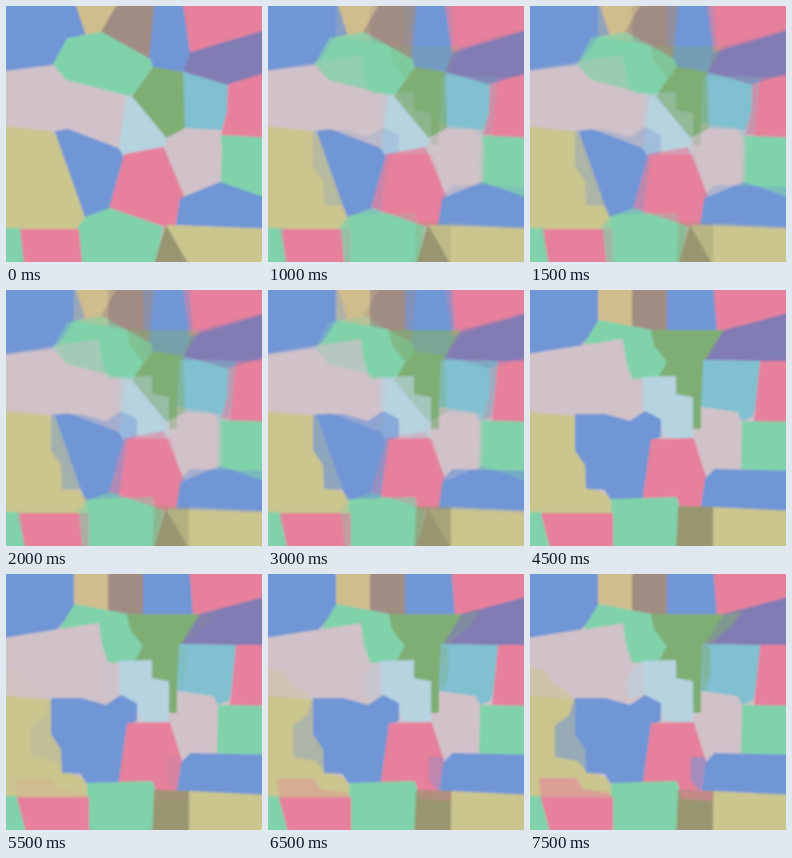
An HTML page for the animation above (8 s loop, 256 px wide and 256 px high).

```html
<!DOCTYPE html>
<html>
<head>
<meta charset="utf-8">
<style>
html, body { margin: 0; width: 100%; height: 100%; overflow: hidden; background: #c9bfc2; }
svg { display: block; width: 100vw; height: 100vh; }
path { stroke-width: 2; stroke-linejoin: round; }
</style>
</head>
<body>
<svg viewBox="0 0 256 256">
  <defs>
    <filter id="soft" filterUnits="userSpaceOnUse" x="-12" y="-12" width="280" height="280">
      <feGaussianBlur stdDeviation="0.9"/>
    </filter>
  </defs>
  <g id="straight" filter="url(#soft)"></g>
  <g id="stepped" filter="url(#soft)"></g>
  <g id="spread" filter="url(#soft)"></g>
</svg>
<script>
const NS = 'http://www.w3.org/2000/svg';
const STEP = 500, LOOP = 8000, FADE_STEPS = 9, SECOND_FADE = 10;
const [straight, stepped, spread] = ['straight', 'stepped', 'spread']
  .map(id => document.getElementById(id));

const C = {
  blue: '#7096d6', mint: '#80d2ab', mauve: '#d0c2c8', sand: '#cbc58e',
  tan: '#d0bd8e', brown: '#a18c83', rose: '#e6809c', violet: '#827cb4',
  green: '#7fae74', teal: '#80c0d0', ice: '#b6d3e0', olive: '#98966f'
};

// Points on the stage border are pushed outwards so the blur never shows there.
const outset = v => v <= 0 ? -10 : v >= 256 ? 266 : v;

function patch(group, color, points) {
  const path = document.createElementNS(NS, 'path');
  const pts = points.split(' ').map(p => p.split(',').map(n => outset(+n)));
  path.setAttribute('d', 'M' + pts.join('L') + 'Z');
  path.setAttribute('fill', C[color]);
  path.setAttribute('stroke', C[color]);
  group.appendChild(path);
}

function cell(color, from, to) {
  patch(straight, color, from);
  patch(stepped, color, to);
}

for (const g of [straight, stepped]) patch(g, 'mauve', '0,0 256,0 256,256 0,256');

cell('blue', '0,0 68,0 80,27 62,33 47,60 0,67',
  '0,0 69,0 69,31 58,46 50,55 0,66');
cell('tan', '68,0 117,0 96,27 80,27',
  '69,0 103,0 103,38 69,32');
cell('brown', '117,0 150,0 144,54 96,26',
  '103,0 138,0 138,41 103,41');
cell('blue', '150,0 177,0 185,47 178,67 147,62 144,54',
  '138,0 184,0 189,20 186,42 138,41');
cell('rose', '177,0 256,0 256,23 185,47',
  '184,0 256,0 256,22 188,42');
cell('violet', '185,47 256,23 256,66 222,79 178,67',
  '190,42 256,22 256,71 175,69');
cell('mint', '62,33 96,27 144,54 146,63 130,86 119,90 60,75 47,60',
  '69,31 95,36 122,41 125,55 138,72 130,87 103,88 95,65 92,50 55,54');
cell('green', '147,62 178,67 180,122 160,132 126,92 146,64',
  '122,41 192,41 174,70 172,138 162,138 162,108 145,105 145,87 130,87 138,72 125,55');
cell('teal', '178,67 222,80 222,106 214,124 180,122',
  '174,71 230,72 230,100 222,126 211,130 207,122 172,118');
cell('rose', '256,66 223,79 222,106 216,129 256,133',
  '231,72 256,72 256,133 225,131');
cell('mint', '216,130 256,133 256,195 214,177 213,140',
  '211,132 256,133 256,182 210,178');
cell('mauve', '159,134 180,123 212,125 215,140 214,177 178,191',
  '172,118 207,123 211,132 210,178 185,181 176,190 163,150 172,138');
cell('ice', '119,90 126,92 160,133 157,143 119,149 112,142',
  '113,88 145,87 145,105 162,108 162,148 135,146 130,130 112,118');
cell('mauve', '0,67 47,60 60,75 119,90 112,142 52,126 44,126 0,119',
  '0,66 92,50 98,90 112,90 112,118 95,131 75,125 46,126 0,122');
cell('sand', '0,120 44,126 51,131 80,212 72,223 0,223',
  '0,122 46,127 46,160 55,175 58,198 78,206 82,223 0,223');
cell('blue', '50,126 62,124 112,143 118,153 104,202 80,211',
  '46,125 75,125 100,132 115,122 130,130 130,146 122,150 114,207 82,210 75,199 57,198 56,175 46,160');
cell('rose', '119,149 157,142 177,190 170,218 153,220 104,203',
  '122,150 163,149 176,190 170,217 150,217 146,207 114,207');
cell('blue', '175,193 214,177 256,195 256,222 171,218',
  '176,189 185,180 256,182 256,222 172,217');
cell('mint', '80,212 104,203 156,221 147,256 76,256 72,223',
  '82,210 146,208 149,217 146,256 83,256');
cell('olive', '160,221 188,256 147,256',
  '149,217 184,218 184,256 147,256');
cell('sand', '162,220 256,224 256,256 188,256',
  '184,218 256,222 256,256 184,256');
cell('mint', '0,223 15,223 20,256 0,256',
  '0,223 11,223 23,256 0,256');
cell('rose', '15,224 72,224 76,256 20,256',
  '12,224 82,224 82,256 23,256');

// Areas that the last arrangement takes over
patch(spread, 'sand', '0,94 14,97 22,110 36,118 42,126 0,124');
patch(spread, 'blue', '45,126 40,142 26,152 26,182 48,186 57,196 56,175 47,160');
patch(spread, 'rose', '10,205 46,205 52,216 78,220 80,223 12,223');
patch(spread, 'mint', '78,33 90,36 90,49 56,54 64,44');
patch(spread, 'ice', '112,89 104,94 98,106 100,124 112,119');
patch(spread, 'green', '191,43 210,38 202,50 180,69 176,68');
patch(spread, 'green', '174,72 179,74 179,100 174,116');
patch(spread, 'blue', '174,184 162,184 162,206 170,216 174,194');
patch(spread, 'rose', '150,217 182,218 182,226 152,224');

function draw(ms) {
  const n = Math.floor((ms % LOOP) / STEP);
  stepped.setAttribute('opacity', Math.min(1, n / FADE_STEPS));
  spread.setAttribute('opacity', Math.max(0, (n - SECOND_FADE) / FADE_STEPS));
}

const start = performance.now();
function tick() {
  draw(performance.now() - start);
  requestAnimationFrame(tick);
}
tick();
</script>
</body>
</html>
```
